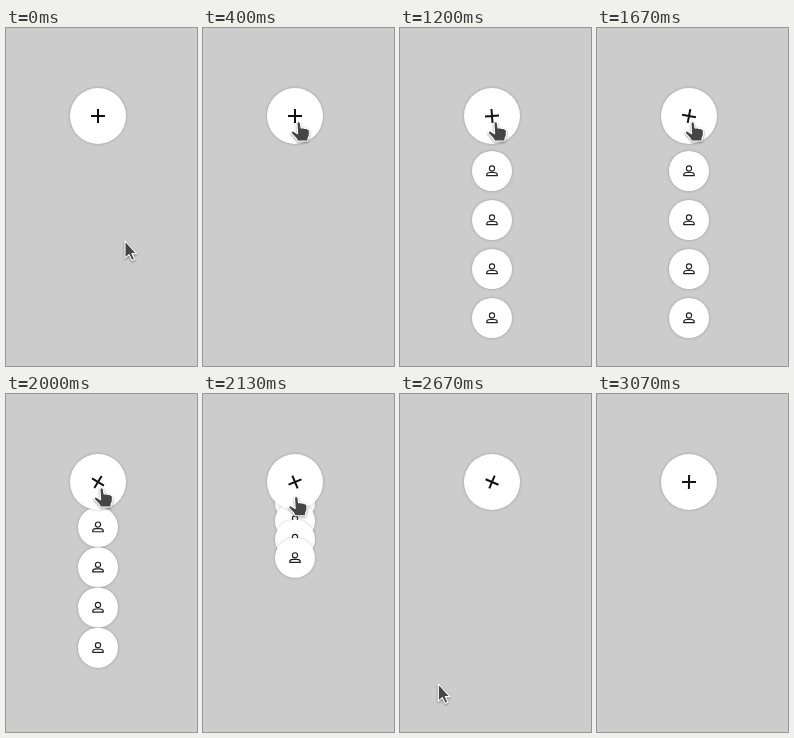
Recreate the animation shown at these times as an HTML page. Size 191 by 338 pixels, loop 3.14 s.

```html
<!DOCTYPE html>
<html lang="en">
<head>
<meta charset="utf-8">
<title>Floating menu</title>
<style>
  html, body { margin: 0; width: 100%; height: 100%; overflow: hidden; background: #ccc; }
  svg { display: block; width: 100%; height: 100%; }
  .disc { fill: #fff; filter: drop-shadow(0 0 1.5px rgba(0, 0, 0, .24)); }
  .person { fill: none; stroke: #222; stroke-width: 1.15; stroke-linejoin: round; }
  .pointer { fill: #454545; stroke: #fff; stroke-width: 1.1; stroke-linejoin: round;
             filter: drop-shadow(.5px 1px 1px rgba(0, 0, 0, .4)); }
</style>
</head>
<body>
<svg viewBox="0 0 191 338">
  <defs>
    <g id="item">
      <circle class="disc" r="20"/>
      <g class="person">
        <circle cy="-2.5" r="2.6"/>
        <path d="M-5.3 4.6V4C-5.3 2.2-3.4 1.5-2 1.5H2C3.4 1.5 5.3 2.2 5.3 4V4.6Z"/>
      </g>
    </g>
  </defs>
  <g id="items"></g>
  <circle class="disc" cx="92" cy="88" r="28"/>
  <path id="plus" d="M-7 0H7M0-7V7" stroke="#111" stroke-width="2"/>
  <g id="cursor">
    <path id="arrow" class="pointer" d="M0 0V17.2L4 13.7L7 19.6L9.6 18.3L6.9 12.6H11.6Z"/>
    <path id="hand" class="pointer" d="M-3 1.2Q-2.7-.4-1.2-.2Q.2 0 .4 1.5L1 6L3.2 5.7L4.8 6.4L6.4 6.2L7.6 7.2Q9.2 7 9.4 9L9.3 13.5L8 16.5V19H-2.4L-4.3 15.8L-8.5 11.4Q-9.2 9.8-7.8 9.1Q-6.6 8.8-5.2 10L-2.4 11.7Z"/>
  </g>
</svg>
<script>
const LOOP = 3140, TICKS = 47, TICK = 1000 / 15;
const CENTER = { x: 92, y: 88 };
const OPEN = 795, CLOSE = 1955, SLIDE = 400, TURN = 720;

const $ = id => document.getElementById(id);
const clamp = v => Math.min(1, Math.max(0, v));
const progress = (t, start, duration) => clamp((t - start) / duration);
const place = (node, x, y, extra = '') =>
  node.setAttribute('transform', `translate(${x} ${y}) ${extra}`);

// cubic-bezier(0, 0, .58, 1), solved by bisection
function easeOut(x) {
  let low = 0, high = 1;
  for (let i = 0; i < 24; i++) {
    const s = (low + high) / 2;
    if (1.74 * (1 - s) * s * s + s ** 3 < x) low = s; else high = s;
  }
  return 3 * low * low - 2 * low ** 3;
}

const smooth = x => x * x * (3 - 2 * x);

// [time, x, y] of the pointer tip on its way out
const exitPath = [
  [2070, 97, 94], [2200, 92, 112], [2330, 74, 161], [2400, 63, 192],
  [2600, 42, 270], [2800, 31, 330], [2870, 29, 350]
];

function pointerAt(t) {
  if (t < exitPath[0][0]) {
    const p = smooth(progress(t, 20, 380));
    return [119 - 22 * p, 213 - 119 * p];
  }
  const next = exitPath.findIndex(k => k[0] > t);
  if (next < 0) return [29, 400];
  const [a, b] = [exitPath[next - 1], exitPath[next]];
  const p = progress(t, a[0], b[0] - a[0]);
  return [a[1] + (b[1] - a[1]) * p, a[2] + (b[2] - a[2]) * p];
}

const items = Array.from({ length: 4 }, () => {
  const use = document.createElementNS('http://www.w3.org/2000/svg', 'use');
  use.setAttribute('href', '#item');
  return $('items').appendChild(use);
});

function draw(t) {
  const spread = easeOut(progress(t, OPEN, SLIDE)) - easeOut(progress(t, CLOSE, SLIDE));
  items.forEach((item, i) => place(item, CENTER.x, CENTER.y + (55 + 49 * i) * spread));

  const opened = easeOut(progress(t, OPEN, 1200));
  const closed = 1 - (1 - progress(t, CLOSE - 5, 1150)) ** 1.9;
  const angle = TURN * (t < CLOSE ? opened : 1 - closed);
  place($('plus'), CENTER.x, CENTER.y, `rotate(${angle})`);

  const [x, y] = pointerAt(t);
  const hovering = Math.hypot(x - CENTER.x, y - CENTER.y) < 28;
  place($('cursor'), x, y);
  $('hand').style.display = hovering ? '' : 'none';
  $('arrow').style.display = hovering ? 'none' : '';
}

const start = performance.now();
function frame() {
  const t = (performance.now() - start) % LOOP;
  const tick = Math.min(TICKS - 1, Math.floor((t + 8) / (LOOP / TICKS)));
  draw(tick * TICK);
  requestAnimationFrame(frame);
}
frame();
</script>
</body>
</html>
```
